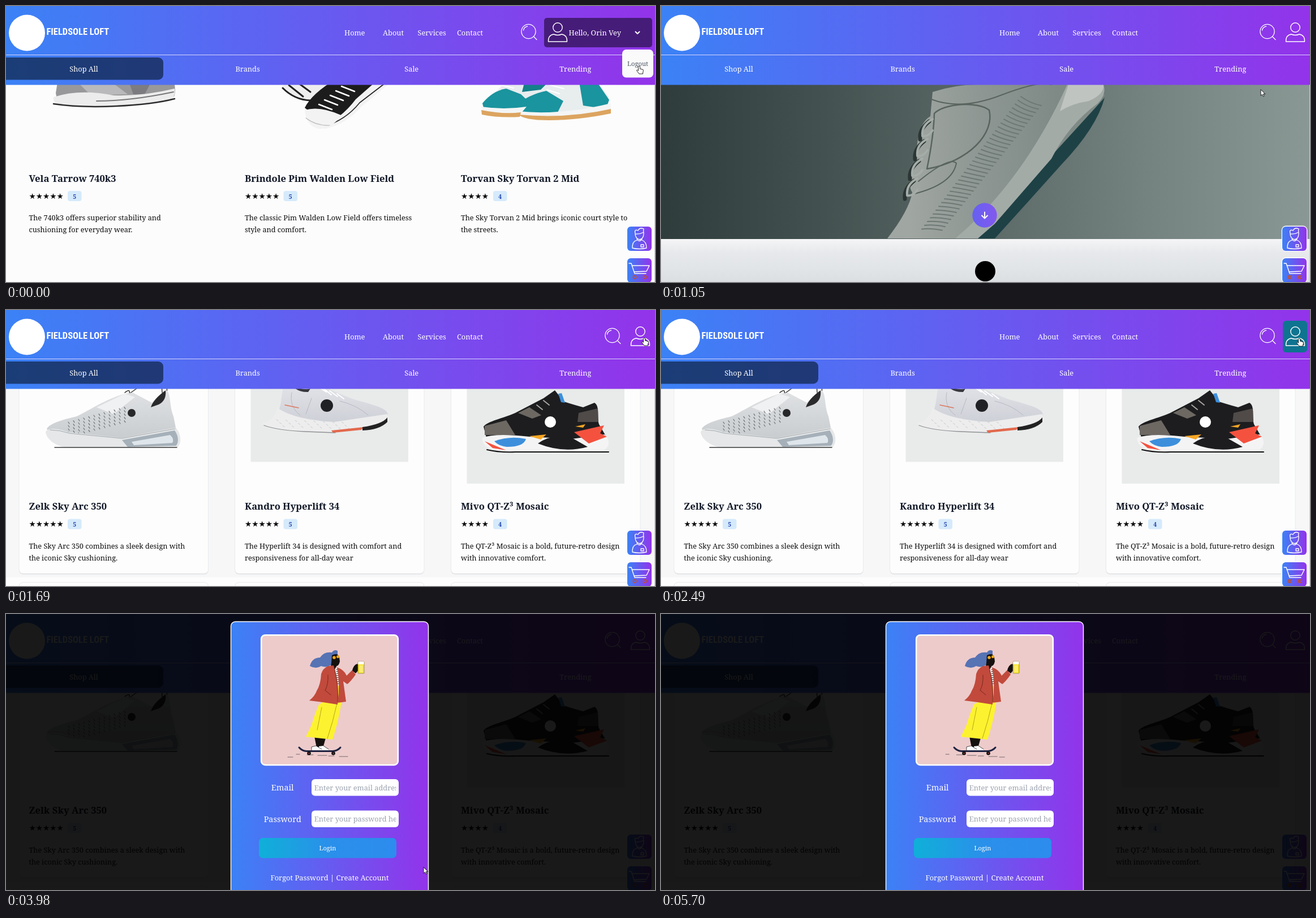
These frames come from a looping animation (1147x488 px, 5.72 s). An HTML page with a canvas:

```html
<!DOCTYPE html>
<html lang="en">
<head>
<meta charset="utf-8">
<title>Shoe shop</title>
<style>
html, body { margin: 0; width: 1147px; height: 488px; overflow: hidden; background: #fcfcfc; }
canvas { display: block; }
</style>
</head>
<body>
<canvas id="stage" width="1147" height="488"></canvas>
<script>
const ctx = document.getElementById('stage').getContext('2d');
const W = 1147, H = 488, LOOP = 5720;
const SERIF = '"Noto Serif", Georgia, serif';
const BLUE = '#3b82f6', PURPLE = '#9333ea';

function fill(color, d) { ctx.fillStyle = color; ctx.fill(new Path2D(d)); }
function line(color, width, d) {
  ctx.strokeStyle = color; ctx.lineWidth = width;
  ctx.lineCap = ctx.lineJoin = 'round';
  ctx.stroke(new Path2D(d));
}
function rect(color, x, y, w, h) { ctx.fillStyle = color; ctx.fillRect(x, y, w, h); }
function box(x, y, w, h, r, color, edge, width = 1) {
  ctx.beginPath(); ctx.roundRect(x, y, w, h, r);
  if (color) { ctx.fillStyle = color; ctx.fill(); }
  if (edge) { ctx.strokeStyle = edge; ctx.lineWidth = width; ctx.stroke(); }
}
function disc(x, y, r, color) {
  ctx.beginPath(); ctx.arc(x, y, r, 0, 7); ctx.fillStyle = color; ctx.fill();
}
function ring(x, y, r, color, width) {
  ctx.beginPath(); ctx.arc(x, y, r, 0, 7);
  ctx.strokeStyle = color; ctx.lineWidth = width; ctx.stroke();
}
function text(s, x, y, size, color, align = 'left', weight = 400, family = SERIF) {
  ctx.font = `${weight} ${size}px ${family}`;
  ctx.textAlign = align; ctx.fillStyle = color;
  ctx.fillText(s, x, y);
}
function blend(x0, y0, x1, y1, colors) {
  const g = ctx.createLinearGradient(x0, y0, x1, y1);
  colors.forEach((c, i) => g.addColorStop(i / (colors.length - 1), c));
  return g;
}
const fade = (x0, x1, ...colors) => blend(x0, 0, x1, 0, colors);
const drop = (y0, y1, ...colors) => blend(0, y0, 0, y1, colors);
function at(x, y, draw) { ctx.save(); ctx.translate(x, y); draw(); ctx.restore(); }

// Largest condensed size that fits the space beside the badge
const brand = 'FIELDSOLE LOFT';
const brandFont = n => `extra-condensed 700 ${n}px "Roboto Condensed", "Open Sans Condensed", "Noto Sans", "Open Sans", sans-serif`;
let brandSize = 22;
for (; brandSize > 8; brandSize -= 0.5) {
  ctx.font = brandFont(brandSize);
  if (ctx.measureText(brand).width <= 113) break;
}

// ---------- header ----------
function searchIcon(x) {
  ring(x, 45, 12.6, '#fff', 1.3);
  line('#fff', 1.3, `M${x + 9} 54L${x + 14.5} 59.5M${x - 9} 43Q${x - 8} 37 ${x - 2} 36`);
}
function userIcon(x) {
  ring(x, 38, 8.2, '#fff', 1.4);
  line('#fff', 1.4, `M${x - 16.5} 63C${x - 17} 54 ${x - 13} 51 ${x - 7} 50Q${x} 53 ${x + 7} 50C${x + 13} 51 ${x + 17} 54 ${x + 16.5} 63Z`);
}
function header(mode, active, hover) {
  rect(fade(0, W, BLUE, PURPLE), 0, 0, W, 139.5);
  rect('#d9d6fb', 0, 86, W, 1);
  disc(37, 47.5, 32, '#fff');
  ctx.font = brandFont(brandSize); ctx.textAlign = 'left'; ctx.fillStyle = '#fff';
  ctx.fillText(brand, 71.5, 45 + brandSize * 0.36);
  [['Home', 598], ['About', 666], ['Services', 727.5], ['Contact', 797]]
    .forEach(([s, x]) => text(s, x, 52, 12.8, '#fff', 'left', 500));
  if (active) box(-10, 91, 288, 39.5, 9, 'rgba(18,40,80,0.76)');
  ['Shop All', 'Brands', 'Sale', 'Trending']
    .forEach((s, i) => text(s, 137.5 + i * 289.6, 115.5, 12.8, '#fff', 'center', 500));
  if (mode === 'member') {
    searchIcon(923.5);
    box(951, 21, 191, 52, 5, '#461c79');
    userIcon(975);
    text('Hello, Orin Vey', 994.5, 52, 12.9, '#fff', 'left', 500);
    line('#fff', 2, 'M1112.5 45.5L1116 49L1119.5 45.5');
    return;
  }
  searchIcon(1071.5);
  if (mode === 'loading') {
    line('#fff', 3.4, 'M1006 35H1025M1010 42.5H1027M1006 50H1025');
    return;
  }
  if (hover) box(1099, 19, 43, 56, 6, '#0e7490');
  userIcon(1121);
}

// ---------- floating buttons ----------
function sideButtons(icons) {
  for (const y of [390, 446]) {
    box(1097.5, y - 0.7, 44, 44, 7, '#fff', '#fff', 1.5);
    box(1098, y, 43, 43, 6, fade(1098, 1141, BLUE, PURPLE));
  }
  if (!icons) return;
  line('#fff', 1.3, 'M1112 402Q1110 394 1117 397Q1120 391 1127 394Q1126 398 1127 402Q1127 412 1119.5 413Q1112 411 1112 402ZM1112 403Q1120 404 1127 400M1115 412Q1119 419 1124 412M1115 414C1108 416 1107 421 1107 428Q1119 431 1132 428C1132 421 1130 416 1124 414M1122 422h5v4h-5Z');
  line('#fff', 1.4, 'M1101 455H1105L1111 473H1131M1106 459H1137L1132 469L1110 470');
  ring(1111, 479.5, 2.6, '#c2512d', 1.7);
  ring(1129, 479.5, 2.6, '#c2512d', 1.7);
}

// ---------- products ----------
function airShoe() {
  line('#333', 1.5, 'M276 350Q274 331 281 330Q286 332 284 350M210 350Q220 342 218 352L232 342');
  fill(drop(350, 440, '#dfe1e3', '#c6cacd'), 'M72 414C78 404 100 398 125 392C150 380 175 362 210 352L224 350L258 368L283 346C292 350 288 372 296 392L302 422L200 440L90 436Z');
  fill('#f0f1f2', 'M160 376L210 352L228 358L190 388Z');
  fill('#2a2a2c', 'M256 376Q260 362 282 346Q284 364 270 371Z');
  for (let i = 0; i < 60; i++) {
    const x = 110 + (i % 12) * 9, y = 402 - (i % 12) * 2.4 + (i / 12 | 0) * 6;
    line('#666a6e', 1.1, `M${x} ${y}l2 3`);
  }
  fill('#e5e7e8', 'M70 420C72 412 90 412 110 420L205 430L300 412C312 425 310 445 300 448H110C85 444 72 432 70 420Z');
  line('#a4a9ad', 1, 'M78 416Q95 416 112 422L205 431L299 414');
  fill('#a5b0b9', 'M205 434L298 417C306 428 305 440 300 444L215 446Z');
  fill('#dfe6eb', 'M222 437L290 425Q298 432 294 439L226 443Z');
  line('#3b3b3b', 1.5, 'M86 447H302');
  disc(222, 386, 7, '#27282a');
}
function boostShoe() {
  fill(drop(330, 400, '#e4e5ea', '#cfd1d8'), 'M497 324C503 335 520 345 535 340L550 332C570 345 590 352 612 361C640 370 675 376 675 389L668 402L560 402L478 390C490 372 484 345 497 324Z');
  fill('#38393e', 'M497 324C504 338 520 347 538 343L534 349Q508 350 497 324Z');
  line('#fff', 2, 'M548 337l18 12M558 340l17 14M572 347l14 10M585 352l12 9');
  line('#b7b9c2', 1, 'M505 350Q500 375 520 390M590 365Q620 372 640 390M540 360L530 388');
  fill('#ededee', 'M480 377C500 392 540 400 580 402L674 388C678 402 665 412 640 416L580 421L490 417C465 415 452 409 454 403Q472 402 480 377Z');
  for (let i = 0; i < 24; i++) line('#c9cacc', 1, `M${478 + i * 5.500} ${398 + i % 3 * 5 + i * 0.2}l3 2`);
  line('#8f9093', 1.3, 'M456 408Q480 417 530 419L582 421');
  fill('#e2694d', 'M575 417L632 411L628 416L578 421Z');
  fill('#222', 'M630 411Q665 406 674 394V402Q660 416 630 417Z');
  line('#dc775e', 1.5, 'M493 372l24 5');
  disc(567, 373, 11, '#202124');
}
function retroShoe() {
  fill('#1d1d1f', 'M844 410C852 400 878 396 900 386L950 360L970 346L986 366Q1005 372 1020 376L1040 368C1050 374 1044 392 1048 406L1062 430L1000 445L850 434Z');
  fill('#3d8fdc', 'M976 352L982 351L988 368L981 367Z');
  fill('#6d6862', 'M846 409L884 399L900 425H846ZM905 386L925 376L946 390L930 396Z');
  fill('#504b48', 'M1012 386L1046 378L1047 402L1010 402Z');
  line('#a9a6a2', 2, 'M938 372l10 8M950 364l10 8');
  fill('#f4f4f5', 'M842 430Q864 421 925 428L1000 432L1058 424C1070 435 1066 452 1050 454L870 455C850 450 840 440 842 430Z');
  fill('#f6a623', 'M925 427L955 424L945 433ZM1006 410L1024 406L1020 412Z');
  fill('#1d1d1f', 'M940 440Q965 422 1000 430L1028 446Q985 458 940 440Z');
  fill('#3d8fdc', 'M863 436Q890 426 919 432Q915 446 885 446Q870 444 863 436Z');
  fill('#f4523f', 'M1004 420L1057 408L1050 422L1062 428L1030 440ZM846 436L884 452L860 448Z');
  line('#111', 2, 'M850 451Q870 456 900 455H1065');
  disc(962, 402, 10, '#fff');
}
function greyShoe() {
  fill('#98989b', 'M88 154L92 128H296Q301 150 297 160L200 167L90 165Z');
  fill('#b9b9bb', 'M120 128H178L215 156L150 158Z');
  fill('#7c7c80', 'M215 128H260L245 156L225 156Z');
  fill('#ececec', 'M84 161Q130 146 190 158Q240 160 298 146Q300 165 285 168L190 177L100 176Q82 172 84 161Z');
  line('#77777a', 2, 'M160 168Q220 168 296 152');
  line('#2c2c2e', 2.5, 'M84 173Q130 180 195 177Q260 174 298 164');
}
function canvasShoe() {
  fill('#eee', 'M487 142L515 128H580L540 168L505 158Z');
  line('#222', 3, 'M489 145Q510 166 538 167M500 140L525 160M515 135L538 152');
  fill('#1c1c1d', 'M528 180Q540 155 585 128H676Q620 170 600 196L560 205Z');
  fill('#f3f3f3', 'M688 128L628 178Q602 208 565 217L552 216Q592 200 618 165L660 128Z');
  line('#222', 1.6, 'M668 138L625 171Q600 202 562 213');
  fill('#f3f3f3', 'M528 184Q555 176 592 193Q577 217 552 217Q530 211 528 184Z');
  line('#bbb', 1.2, 'M530 198Q548 212 572 211');
  for (let i = 0; i < 5; i++) line('#fff', 2.6, `M${553 + i * 10} ${174 - i * 8}l23 9`);
}
function courtShoe() {
  fill('#e8edee', 'M845 172L890 128H1040L1065 160V188H850Z');
  fill('#1a949e', 'M842 172Q860 150 884 146L910 156L930 175L895 182L844 180Z');
  fill('#1a949e', 'M900 176Q925 156 955 150L985 168L975 188L908 190ZM1012 128H1040L1066 166L1060 182L1020 176Z');
  fill('#148089', 'M918 128H965L945 148L912 152Z');
  fill('#f4f5f5', 'M840 178Q880 184 920 178L910 190L842 186ZM905 186Q980 194 1069 172V184L990 198L908 194Z');
  fill('#dca45f', 'M840 184Q880 192 910 188L908 196Q870 198 841 192ZM906 192Q990 200 1069 182V190Q1010 202 960 202Q915 202 906 192Z');
  line('#fff', 2, 'M962 140l24 6M956 148l22 7M875 140l22 5');
}
const colX = [41, 422.5, 804.5];
const rowOne = [
  ['Zelk Sky Arc 350', 5, 'The Sky Arc 350 combines a sleek design with', 'the iconic Sky cushioning.'],
  ['Kandro Hyperlift 34', 5, 'The Hyperlift 34 is designed with comfort and', 'responsiveness for all-day wear'],
  ['Mivo QT-Z³ Mosaic', 4, 'The QT-Z³ Mosaic is a bold, future-retro design', 'with innovative comfort.']
];
const rowTwo = [
  ['Vela Tarrow 740k3', 5, 'The 740k3 offers superior stability and', 'cushioning for everyday wear.'],
  ['Brindole Pim Walden Low Field', 5, 'The classic Pim Walden Low Field offers timeless', 'style and comfort.'],
  ['Torvan Sky Torvan 2 Mid', 4, 'The Sky Torvan 2 Mid brings iconic court style to', 'the streets.']
];
function captions(row, y) {
  row.forEach(([name, stars, a, b], i) => {
    const x = colX[i], end = x + stars * 11.5;
    text(name, x - 0.5, y, 16.6, '#111827', 'left', 700);
    text('★'.repeat(stars), x - 0.5, y + 30, 13.7, '#0b0b0b', 'left', 400, '"DejaVu Sans", sans-serif');
    box(end + 10.5, y + 16.5, 24.5, 18, 4, '#d5eafb');
    text(stars, end + 22.7, y + 30, 10.5, '#1e40af', 'center', 700);
    text(a, x - 0.5, y + 68.5, 12.7, '#0c0c0c');
    text(b, x - 0.5, y + 89.5, 12.7, '#0c0c0c');
  });
}
function memberPage() {
  rect('#fcfcfc', 0, 0, W, H);
  greyShoe(); canvasShoe(); courtShoe();
  captions(rowTwo, 310.5);
}
function shoes() { airShoe(); boostShoe(); retroShoe(); }
function categories() {
  box(293, 125, 118.5, 39.5, 19.7, '#fbfcff', '#4c82ee', 1);
  text('All categories', 352.5, 150, 12.7, '#2b4fc4', 'center');
  [["Men's Wear", 440.5], ["Women's Wear", 560.5], ['Casual', 701], ['Sport', 789]]
    .forEach(([s, x]) => text(s, x, 150, 12.7, '#15171c'));
}
function shopPage(scroll) {
  rect('#fdfdfd', 0, 0, W, H);
  rect('#f7f7f7', 0, 0, W, 472.5);
  if (!scroll) {
    categories();
    shoes();
    for (const x of [23, 357, 404, 739, 786]) rect('#ececee', x - 0.5, 473, 1, 15);
    rect('#e5e5ea', 815, 473, 278, 15);
    return;
  }
  at(0, 204 - scroll, () => {
    at(0, -204, categories);
    for (const x of [23, 404.5, 786.5]) {
      box(x, -20, 334.5, 487.5, 7, '#e0e2e5');
      box(x, -20, 334.5, 486, 7, '#fdfdfd', '#e8eaed');
      box(x, 481.5, 334.5, 100, 7, '#fdfdfd', '#e8eaed');
    }
    rect('#e8ebea', 432.5, 0, 278.5, 268.5);
    rect('#e8ebea', 814.5, 0, 278.5, 307);
    at(0, -204, shoes);
    captions(rowOne, 353);
  });
}

// ---------- landing page ----------
function heroOne() {
  fill(blend(430, 300, 700, 200, ['#717d79', '#8b9691', '#9fa8a3']), 'M445 139H655Q670 150 666 190L690 235Q704 290 706 345Q728 392 757 421H560L500 340L425 262Q384 235 379 205Q384 174 445 139Z');
  for (let i = 0; i < 40; i++) {
    const x = 436 + i * 5.2, y = 176 + i * 6.4;
    line('#5f6b68', 2, `M${x} ${y}q${16 + i * 0.3} ${-4 + i * 0.1} ${30 + i * 0.5} ${-20 + i * 0.3}`);
  }
  fill('#1d2524', 'M440 205Q470 228 505 290L550 372L588 421H566L500 345L455 265Z');
  fill(drop(150, 421, '#bfc4c0', '#9aa39f', '#66726f'), 'M379 205Q384 174 440 150Q425 180 426 205Q450 250 490 306L566 421H542L480 340Q385 250 379 205Z');
  fill('#c9cdca', 'M380 198Q388 172 440 148Q412 178 402 222Q386 214 380 198Z');
  line('#4a5553', 2, 'M402 226Q440 282 490 338L545 414');
  fill('#1b2323', 'M545 139H604Q585 156 562 154L528 178Q530 158 545 139Z');
  line('#46514f', 3, 'M514 214C514 182 560 166 610 172C640 180 640 258 621 282C570 272 520 252 514 214Z');
  fill(fade(514, 640, '#828d88', '#98a19c'), 'M516 214C516 184 560 168 609 174C637 182 638 256 620 280C570 270 522 250 516 214Z');
  fill('#9aa49f', 'M569 282Q575 270 600 280L690 262Q706 290 692 316Q640 332 608 330Q570 306 569 282Z');
  line('#46514f', 2, 'M569 282Q575 270 600 280L655 284M608 330Q570 306 569 282M608 330Q640 332 660 312');
  for (let i = 0; i < 5; i++) {
    const x = 620 + i * 8, y = 194 + i * 29;
    disc(x, y, 8, '#2e3a39');
    line('#4c5856', 7, `M${x} ${y + 3}Q${x + 30} ${y + 18} ${x + 56 - i * 5} ${y + 6}`);
    line('#b2bab5', 5.5, `M${x} ${y}Q${x + 30} ${y + 14} ${x + 56 - i * 5} ${y + 2}`);
    line('#a2aea7', 4.5, `M${x - 2} ${y + 28}Q${x + 30} ${y + 22} ${x + 44} ${y}`);
  }
}
function heroTwo() {
  fill(blend(440, 300, 700, 300, ['#a0a6a2', '#8d9692', '#7f8a86']), 'M480 152Q520 139 560 139H770L784 158L700 275L580 411H400Q438 362 444 330Q432 310 452 275Q450 210 476 195Z');
  fill('#1e4145', 'M784 162Q770 215 708 280Q650 345 590 411H552L690 265Z');
  fill('#a3aba7', 'M718 139H782Q788 155 772 172Q720 210 690 270L590 385L560 411H520Q640 310 718 139Z');
  fill('#c0c4c1', 'M720 139H782Q784 156 756 168Q728 172 705 186Z');
  for (let i = 0; i < 36; i++) {
    const x = 672 - i * 5, y = 176 + i * 6.3;
    line('#6d7875', 2, `M${x} ${y}q-20 -4 -36 ${-16 + i * 0.4}`);
  }
  line('#59645f', 2, 'M478 165Q530 185 600 158T690 139');
  line('#59645f', 2.5, 'M483 190C500 172 560 168 580 184C590 225 545 275 470 288Q482 230 483 190Z');
  line('#59645f', 2, 'M455 310Q510 265 522 278Q515 315 448 332');
  for (let i = 0; i < 4; i++) {
    const x = 474 - i * 9, y = 204 + i * 35;
    line('#2b3534', 7, `M${x} ${y}q-18 14 -16 32`);
    line('#a5ada8', 4, `M${x + 6} ${y - 4}q-20 10 -18 30q10 2 18 -10`);
  }
}
function homePage(second) {
  const edge = second ? 412 : 422;
  rect(drop(edge, H, '#f5f5f6', '#e6e8eb', '#e2e5e8', '#dcdfe2'), 0, 0, W, H);
  ctx.save();
  ctx.beginPath(); ctx.rect(0, 0, W, edge); ctx.clip();
  rect(fade(0, W, '#2f3c3c', '#435150', '#5b6967', '#748280', '#8a9895'), 0, 0, W, edge);
  (second ? heroTwo : heroOne)();
  ctx.restore();
  const y = second ? 370 : 372;
  disc(572, y, 21.7, fade(550, 594, '#6461f1', '#8458ee'));
  line('#fff', 2, `M572 ${y - 5.5}V${y + 5}M567 ${y + 0.5}L572 ${y + 5.5}L577 ${y + 0.5}`);
  if (second) disc(573, 469, 18, '#000');
}

// ---------- login dialog ----------
function skater(u) {
  const sway = Math.sin(u / 860 * Math.PI * 2) * 1.5;
  const roll = (u - 3960) * 0.0698;
  for (let i = 0; i < 6; i++) {
    const x = 497 + ((16 + i * 19 - roll) % 110 + 110) % 110;
    line('#77676a', 1, `M${x} ${248 + i * 7 % 6}h${6 + i * 5 % 11}`);
  }
  fill('#5673b4', `M586 65Q580 62 576 68Q562 66 555 ${78 + sway}Q541 ${78 + sway} 537 ${91 - sway}Q548 98 557 ${93 + sway}Q566 96 576 89L586 74Z`);
  fill('#15110f', 'M576 73Q586 68 589 76L590 84Q588 92 584 92L583 97H573L575 87Z');
  disc(580, 77, 2.8, '#f5a91d'); disc(586.5, 75.5, 2.5, '#f5a91d');
  fill('#f3f1ee', 'M582 95L588 94Q593 108 594 126H585Z');
  for (let y = 98; y < 126; y += 3.6) line('#252525', 1, `M584 ${y}h${5 + (y - 98) / 7}`);
  fill('#15110f', 'M545 216H566L560 237H549Z');
  fill('#fdf22f', 'M560 156L588 126H595Q594 170 577 222L530 217Q536 205 540 196Q545 178 553 160Z');
  line('#b4a51e', 1, 'M585 158Q578 190 568 220M558 165Q553 190 550 205');
  fill('#c14a3c', 'M569 92L579 91Q590 125 586 160L560 156L536 153Q546 145 549 136Q556 125 557 106Q560 96 569 92Z');
  fill('#c14a3c', 'M585 94Q598 99 602 109L612 99L618 107Q608 121 603 124L596 119L601 155L586 157Q591 126 585 94Z');
  line('#78291f', 1, 'M569 108Q570 124 564 135L574 143M580 95Q588 124 586 155');
  fill('#15110f', 'M612 100Q614 90 621 88L625 94Q623 100 618 105Z');
  box(622, 84, 11, 21, 1, '#f7e22b', '#8b804d', 0.8);
  rect('#fff', 622.5, 84, 10, 5);
  line('#fff', 1, 'M626 91V103M629 91V103');
  fill('#fff', 'M540 242V235L548 233L558 239L559 242ZM553 241V234L561 233L570 239V242Z');
  line('#222', 0.8, 'M540 242V235L548 233L558 239M561 233L570 239');
  line('#1e2240', 3, 'M518 236Q523 242 531 242.5H577Q586 242 591 236');
  for (const x of [535.5, 578.5]) {
    disc(x, 246.3, 3.3, '#111'); disc(x, 246.3, 1, '#c44');
  }
}
function field(label, hint, y) {
  text(label, 488.7, y + 20, 14.4, '#fff', 'center', 500);
  box(540, y, 154, 29.5, 6, '#fff');
  ctx.save();
  ctx.beginPath(); ctx.rect(545, y, 144.3, 30); ctx.clip();
  text(hint, 544.7, y + 19.5, 12.8, '#9ca3af');
  ctx.restore();
}
function dialog(u) {
  box(397.5, 13.5, 349, 500, 8, fade(397, 747, BLUE, PURPLE), '#fff', 1.4);
  box(451.2, 37.2, 241.6, 229.8, 7, '#edcbcb', '#fff', 2.6);
  skater(u);
  field('Email', 'Enter your email address', 292);
  field('Password', 'Enter your password here', 347.5);
  box(447, 396, 243, 35.5, 7, fade(447, 690, '#0fb0d8', '#2a90ea', '#2d8cee'));
  text('Login', 568.5, 417.5, 11.1, '#fff', 'center', 500);
  text('Forgot Password | Create Account', 572, 470.5, 12.9, '#fff', 'center', 500);
}

// ---------- pointer: step, x, y ----------
const trail = [
  [0, 1119, 106], [2, 1110, 114], [4, 1107, 117], [6, 1104, 122], [8, 1060, 148],
  [10, 1131, 52], [13, 1128, 49], [15, 1126, 46], [17, 1138, 67], [19, 1128, 50],
  [22, 1125, 60], [23, 1098, 150], [25, 852, 238], [26, 745, 240], [28, 737, 424],
  [29, 730, 442], [30, 738, 448], [32, 737, 448]
];
function pointer(step) {
  if (step >= 32) return;
  const i = trail.findIndex(k => k[0] > step) - 1;
  const [s0, x0, y0] = trail[i], [s1, x1, y1] = trail[i + 1];
  const k = (step - s0) / (s1 - s0);
  const hand = step < 2 || (step >= 10 && step < 20);
  at(x0 + (x1 - x0) * k, y0 + (y1 - y0) * k, () => {
    const d = hand
      ? 'M-1.5 1Q0 -1 1.5 1V5L7 6.5Q8 8 6.5 12V14H0L-4.5 8Q-4 6 -1.5 8Z'
      : 'M0 0V10.5L2.5 8.3L4.3 12L6 11.2L4.3 7.6H7.5Z';
    fill('#fff', d);
    line('#111', 0.9, d);
  });
}

function draw(t) {
  const step = Math.floor((t + 34) / 132.4), u = step * 132;
  ctx.clearRect(0, 0, W, H);
  if (step < 2) {
    memberPage();
    header('member', true);
    box(1089, 77, 55, 49.5, 7, '#fafafb');
    text('Logout', 1116.5, 106, 11.2, '#4b5563', 'center');
  } else if (step < 9) {
    homePage(step >= 6);
    header(step < 5 ? 'loading' : 'guest', false);
  } else {
    const k = Math.min(1, Math.max(0, (step - 10) / 3));
    shopPage(204 * k * (2 - k));
    header('guest', true, step === 19);
  }
  rect('#cfcfd4', 1146, 139, 1, H);
  sideButtons(step < 2 || step >= 5);
  if (step >= 20) {
    const shown = Math.min(1, (step - 19) / 3);
    rect(`rgba(0,0,0,${0.9 * shown})`, 0, 0, W, H);
    ctx.globalAlpha = shown;
    dialog(u);
    ctx.globalAlpha = 1;
  }
  pointer(step);
}
function tick() {
  draw(performance.now() % LOOP);
  requestAnimationFrame(tick);
}
tick();
</script>
</body>
</html>
```
